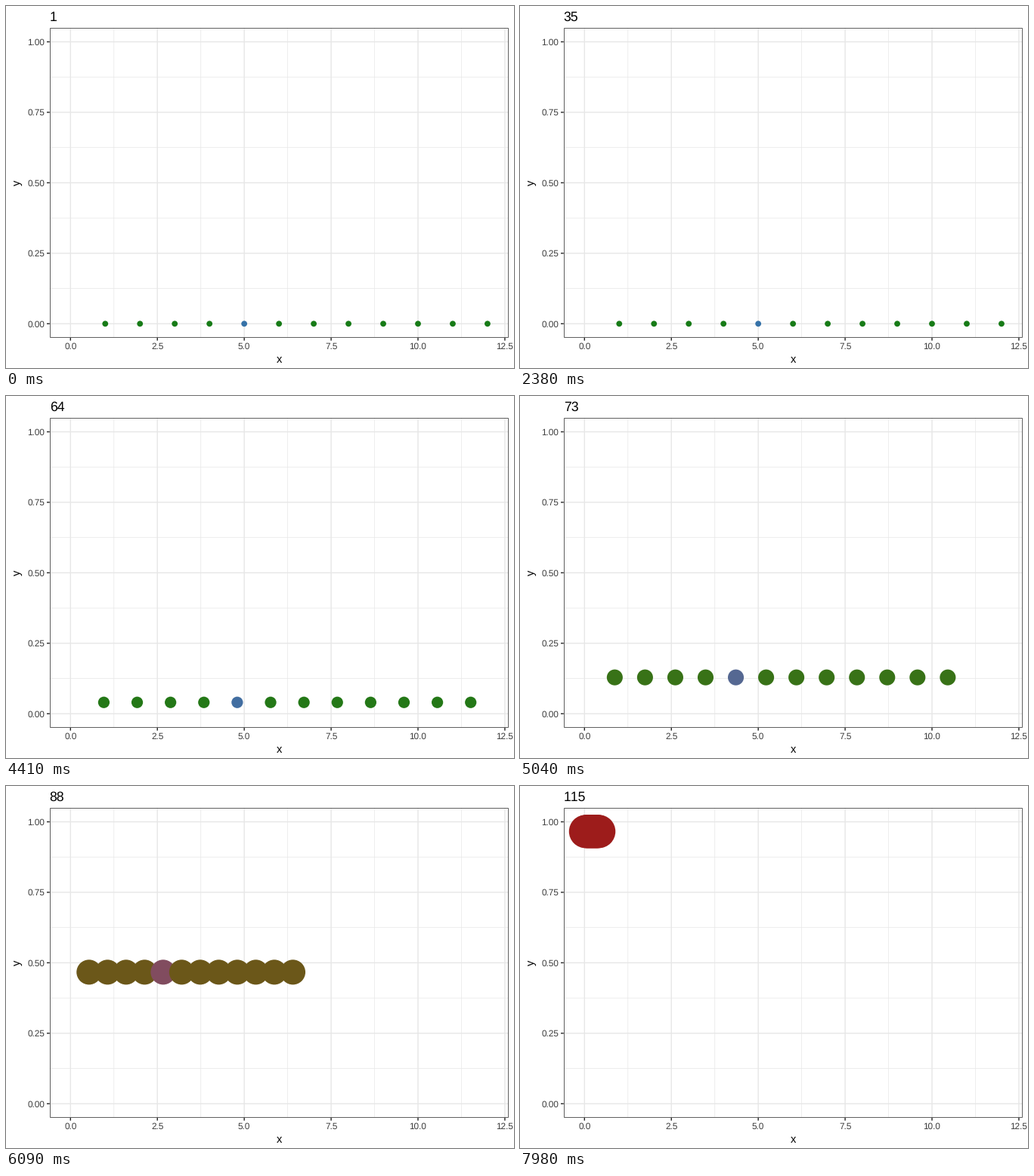
Write a matplotlib script that moves like this. It is 672 px wide and 480 px high and loops after 8 s.

```python
import numpy as np
import matplotlib.pyplot as plt
from matplotlib.animation import FuncAnimation
from matplotlib.collections import LineCollection
from matplotlib.colors import to_rgb
from matplotlib.patches import Rectangle

W, H, DPI = 672, 480, 96
LOOP, TICK, STEP = 8000, 20, 70      # ms: loop, redraw interval, counter step
START, LENGTH = 45, 88               # counter steps of the tween
COUNT, ODD = 12, 4
GAMMA = 1.2
GRID, INK, TEXT = "#e7e7e7", "#252525", "#3d3d3d"

plt.rcParams["font.family"] = "Liberation Sans"
plt.rcParams["text.hinting"] = "none"
plt.rcParams["text.kerning_factor"] = 12     # large enough to switch kerning off

TO_XYZ = np.array([[0.4124, 0.3576, 0.1805],
                   [0.2126, 0.7152, 0.0722],
                   [0.0193, 0.1192, 0.9505]])
WHITE = TO_XYZ.sum(axis=1)


def px(width):
    """Pixels to points."""
    return width * 72 / DPI


def sx(x):
    return 85.3 + 45.97 * x


def sy(y):
    return 421.3 - 373.8 * y


def to_cube(rgb):
    """Cube-root XYZ, in which mixing equals mixing in Lab."""
    c = np.asarray(rgb)
    lin = np.where(c > 0.04045, ((c + 0.055) / 1.055) ** 2.4, c / 12.92)
    return np.cbrt(TO_XYZ @ lin / WHITE)


def from_cube(f):
    lin = np.clip(np.linalg.solve(TO_XYZ, f ** 3 * WHITE), 0, 1)
    c = np.where(lin > 0.0031308, 1.055 * lin ** (1 / 2.4) - 0.055, 12.92 * lin)
    return np.clip(c, 0, 1) ** GAMMA


def ease(t):
    t = min(max(t, 0), 1)
    return 4 * t ** 3 if t < 0.5 else 1 - 4 * (1 - t) ** 3


GREEN, BLUE, RED = (to_cube(to_rgb(c)) for c in ("forestgreen", "steelblue", "#ad1f27"))

fig = plt.figure(figsize=(W / DPI, H / DPI), dpi=DPI, facecolor="white")
ax = fig.add_axes([0, 0, 1, 1])
ax.set(xlim=(0, W), ylim=(H, 0))
ax.axis("off")

left, right, top, bottom = sx(-0.6), sx(12.6), sy(1.05), sy(-0.05)


def lines(segments, color, width, z):
    ax.add_collection(LineCollection(segments, colors=color, linewidths=px(width),
                                     capstyle="butt", snap=False, zorder=z),
                      autolim=False)


def grid(xs, ys, width, z):
    lines([[(sx(x), top), (sx(x), bottom)] for x in xs]
          + [[(left, sy(y)), (right, sy(y))] for y in ys], GRID, width, z)


def label(x, y, text, size, color="black", **kw):
    return ax.text(x, y, text, fontsize=size, color=color, va="baseline", **kw)


xticks = np.arange(0, 12.6, 2.5)
yticks = np.arange(0, 1.01, 0.25)
grid(xticks[:-1] + 1.25, yticks[:-1] + 0.125, 0.71, 1)
grid(xticks, yticks, 1.42, 2)

dots = ax.scatter(np.zeros(COUNT), np.zeros(COUNT), linewidths=0, snap=False, zorder=3)

ax.add_patch(Rectangle((58.5, 29.5), 606, 410, fill=False, ec="#606060",
                       lw=px(1), snap=False, zorder=4))
lines([[(sx(x), bottom), (sx(x), bottom + 3.67)] for x in xticks]
      + [[(left - 3.67, sy(y)), (left, sy(y))] for y in yticks], INK, 1.42, 4)

for x in xticks:
    label(sx(x), 455, f"{x:.1f}", 8.8, TEXT, ha="center")
for y in yticks:
    label(51.1, sy(y) + 4.2, f"{y:.2f}", 8.8, TEXT, ha="right")
label(361, 472.8, "x", 11, ha="center")
label(19.4, 234.4, "y", 11, ha="center", rotation=90, rotation_mode="anchor")
title = label(57.7, 20.2, "1", 13.2, ha="left")

base = np.arange(1, COUNT + 1)


def update(i):
    step = (i * TICK + TICK // 2) // STEP + 1
    p = ease((step - START) / LENGTH)
    radius = 3.9 + 18.5 * np.sqrt(p)
    colors = [from_cube((1 - p) * (BLUE if k == ODD else GREEN) + p * RED)
              for k in range(COUNT)]
    dots.set_offsets(np.column_stack([sx(base * (1 - p)), np.full(COUNT, sy(p))]))
    dots.set_sizes(np.full(COUNT, px(2 * radius) ** 2))
    dots.set_facecolors(colors)
    title.set_text(str(step))
    return dots, title


anim = FuncAnimation(fig, update, frames=LOOP // TICK, interval=TICK,
                     init_func=lambda: update(0), repeat=True, repeat_delay=0,
                     blit=False)
plt.show()
```
